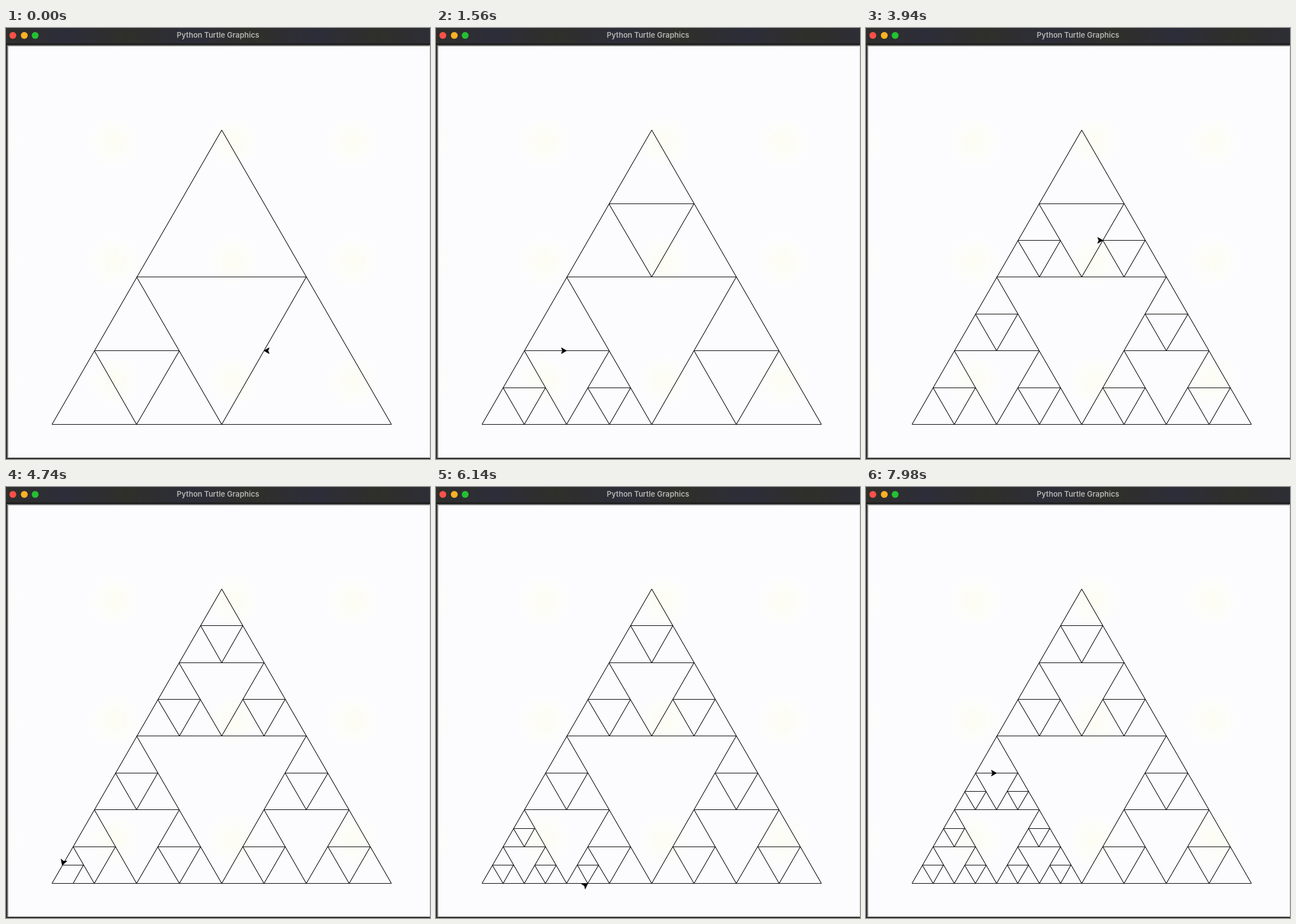
These frames come from a looping animation (742x754 px, 8000 ms). An HTML page with a canvas:

```html
<!DOCTYPE html>
<html lang="en">
<head>
<meta charset="utf-8">
<title>Python Turtle Graphics</title>
<style>
  html, body { margin: 0; width: 100%; height: 100%; overflow: hidden; }
  body { position: relative; background: #2c2c2e; }
  .bar {
    position: absolute; inset: 0 0 auto; height: 27px;
    background: repeating-linear-gradient(90deg, #2f2f2a -10px, #2d2d3a 105px, #2f2f2a 210px);
    border-bottom: 3px solid #1e1e1e;
    font: 600 13px/25px Inter, sans-serif; color: #b4b4b1; text-align: center;
  }
  .bar i { position: absolute; top: 7px; width: 12px; height: 12px; border-radius: 50%; }
  .page {
    position: absolute; left: 2px; top: 30px; width: 737px; height: 719px;
    border: 2px solid #8b8b8b; border-color: #8b8b8b #dcdcdc #c8c8c8 #8b8b8b;
    border-right-width: 1px; border-bottom-width: 1px;
    background: radial-gradient(circle, #fdfdf3, #fcfcfe 32%) 81px 63px / 209px 209px #fcfcfe;
  }
  canvas { position: absolute; left: 0; top: 0; }
</style>
</head>
<body>
<div class="bar">
  <i style="left:6px;background:#fc5048"></i>
  <i style="left:26px;background:#fdb125"></i>
  <i style="left:45px;background:#24c032"></i>
  Python Turtle Graphics
</div>
<div class="page"></div>
<canvas width="742" height="754"></canvas>
<script>
const ctx = document.querySelector('canvas').getContext('2d');

const SIDE = 594.4, LEFT = 80.1, BASE = 693.65, RISE = 515.4 / SIDE;
const HOP = 77.09;   // longest glide per screen update
const SWING = 30;    // widest turn per screen update
const LOOP = 8000;

// Middle triangles of one level: left, right, then top, recursively.
function middles(level, x = LEFT, y = BASE, side = SIDE) {
  const half = side / 2;
  if (level === 1) return [{ x: x + half, y, side: half }];
  return [[x, y], [x + half, y], [x + half / 2, y - half * RISE]]
    .flatMap(([cx, cy]) => middles(level - 1, cx, cy, half));
}

const corners = ({ x, y, side }) => [
  [x, y], [x + side / 2, y - side * RISE], [x - side / 2, y - side * RISE]
];
const edges = points => points.map((p, i) => [p, points[(i + 1) % 3]]);

const lines = [
  ...edges([[LEFT, BASE], [LEFT + SIDE, BASE], [LEFT + SIDE / 2, BASE - SIDE * RISE]]),
  ...edges(corners(middles(1)[0])),
  ...edges(corners(middles(2)[0]))
];
const GIVEN = lines.length;

const todo = [...middles(2).slice(1), ...middles(3), ...middles(4)];
const turtle = { x: todo[0].x, y: todo[0].y, heading: 0 };
const poses = [];
const record = from => poses.push({ ...turtle, count: lines.length, from });

function turn(angle) {
  const start = turtle.heading;
  const steps = 1 + Math.floor(Math.abs(angle) / SWING);
  for (let i = 1; i <= steps; i++) {
    turtle.heading = start + angle * i / steps;
    record();
  }
  record();
}

function glide([x, y], pen) {
  const start = [turtle.x, turtle.y];
  const dx = x - start[0], dy = y - start[1];
  const hops = 1 + Math.floor(Math.hypot(dx, dy) / HOP);
  for (let i = 1; i < hops; i++) {
    turtle.x = start[0] + dx * i / hops;
    turtle.y = start[1] + dy * i / hops;
    record(pen && start);
  }
  turtle.x = x;
  turtle.y = y;
  if (pen) lines.push([start, [x, y]]);
  record();
}

record();
todo.forEach((triangle, i) => {
  const [bottom, right, left] = corners(triangle);
  if (i) glide(bottom, false);
  turn(60);
  for (const point of [right, left, bottom]) {
    glide(point, true);
    turn(120);
  }
  turtle.heading -= 360;
  turn(-60);
});

// Pace of the drawing: [tick, pose reached]; it slows as lines pile up.
const pace = [[0, 14], [34, 135], [52, 205], [61, 235], [85, 324], [118, 432], [146, 524], [171, 603]];

function poseAt(tick) {
  const i = pace.findIndex(([end], n) => n && tick <= end);
  const [t0, p0] = pace[i - 1], [t1, p1] = pace[i];
  return poses[Math.round(p0 + (p1 - p0) * (tick - t0) / (t1 - t0))];
}

// Ticks come in threes: two short ones and a long one every 140 ms.
function tickAt(ms) {
  if (ms < 120) return ms < 20 ? 0 : 1;
  const rest = (ms - 120) % 140;
  return 2 + 3 * Math.floor((ms - 120) / 140) + Math.min(2, Math.floor(rest / 20));
}

const snap = v => Math.floor(v) + 0.5;

function segment([a, b]) {
  ctx.moveTo(snap(a[0]), snap(a[1]));
  ctx.lineTo(snap(b[0]), snap(b[1]));
}

function draw(tick) {
  const { x, y, heading, count, from } = poseAt(tick);
  ctx.clearRect(0, 0, 742, 754);
  ctx.fillStyle = ctx.strokeStyle = '#000';
  ctx.lineWidth = 1.1;
  ctx.beginPath();
  lines.slice(0, tick ? count : GIVEN).forEach(segment);
  if (from) segment([from, [x, y]]);
  ctx.stroke();

  ctx.save();
  ctx.translate(snap(x), snap(y));
  ctx.rotate(-heading * Math.PI / 180);
  ctx.beginPath();
  ctx.moveTo(0, 0);
  ctx.lineTo(-9, -5);
  ctx.lineTo(-7, 0);
  ctx.lineTo(-9, 5);
  ctx.closePath();
  ctx.fill();
  ctx.lineWidth = 1;
  ctx.stroke();
  ctx.restore();
}

let begin, shown;
function play(now) {
  begin ??= now;
  const tick = tickAt((now - begin) % LOOP);
  if (tick !== shown) draw(shown = tick);
  requestAnimationFrame(play);
}
draw(shown = 0);
requestAnimationFrame(play);
</script>
</body>
</html>
```
